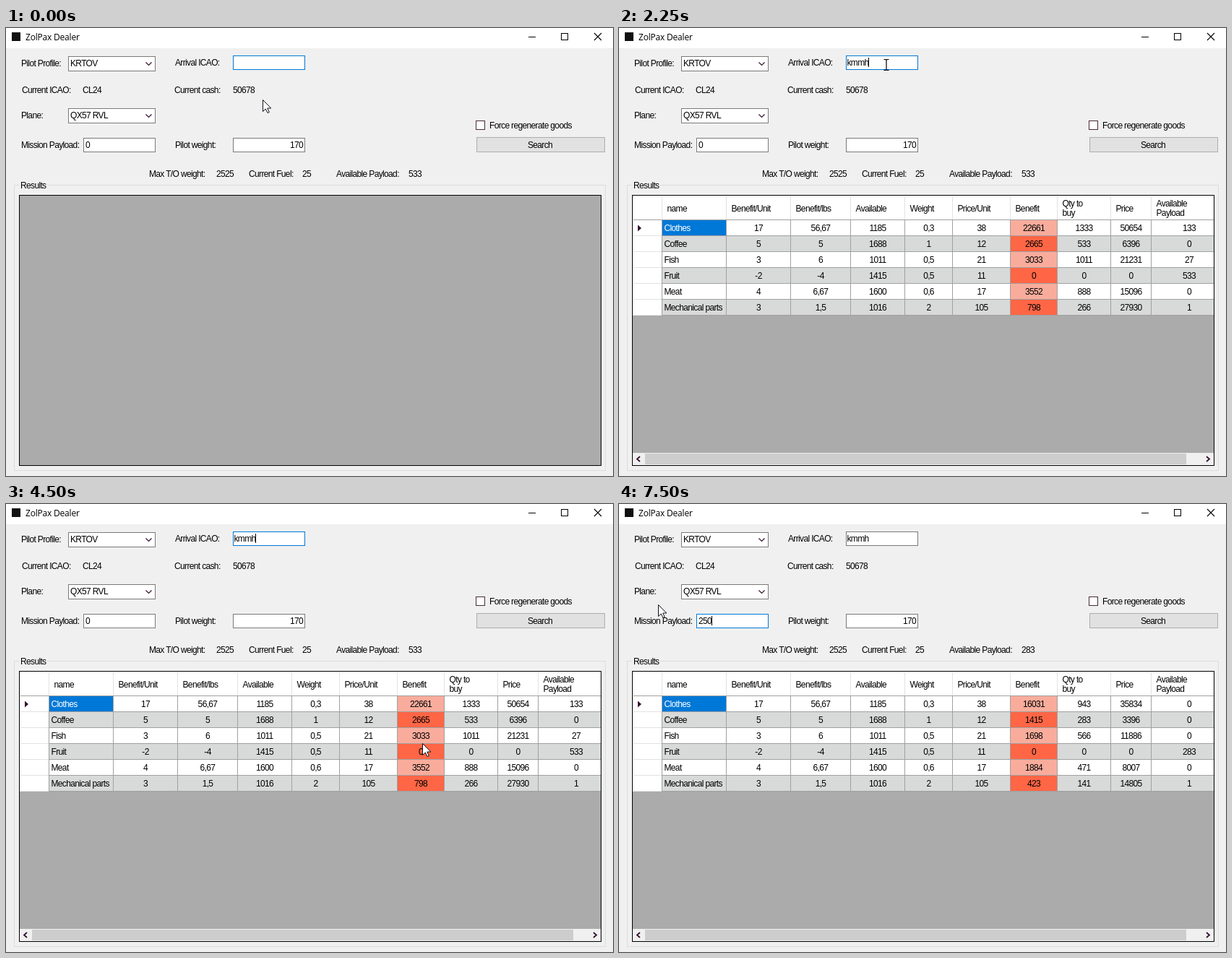
These frames come from a looping animation (840x620 px, 8 s). An HTML page:

```html
<!DOCTYPE html>
<html lang="en">
<head>
<meta charset="utf-8">
<title>ZolPax Dealer</title>
<style>
  html, body { margin: 0; width: 840px; height: 620px; overflow: hidden; background: #f0f0f0; }
  svg { display: block; }
  rect, line { shape-rendering: crispEdges; }
  text { font: 12px "Liberation Sans", Arial, sans-serif; letter-spacing: -.65px; white-space: pre; }
  .title { font: 12px "Open Sans", "Noto Sans", sans-serif; letter-spacing: -.2px; }
  .mid { text-anchor: middle; }
  .end { text-anchor: end; }
</style>
</head>
<body>
<svg id="stage" width="840" height="620" viewBox="0 0 840 620"></svg>
<script>
const LOOP = 8000, BLUE = '#0078d7', EDGE = '#7a7a7a', DARK = '#35102f', GRID = '#a0a0a0';
const stage = document.getElementById('stage');
let layer = stage;

function el(tag, attrs, content) {
  const node = document.createElementNS('http://www.w3.org/2000/svg', tag);
  for (const key in attrs) node.setAttribute(key, attrs[key]);
  if (content !== undefined) node.textContent = content;
  return layer.appendChild(node);
}
const rect = (x, y, w, h, fill) => el('rect', { x, y, width: w, height: h, fill });
const box = (x, y, w, h, fill, stroke) =>
  el('rect', { x: x + .5, y: y + .5, width: w - 1, height: h - 1, fill, stroke });
const text = (x, y, s, cls = '') => el('text', { x, y, class: cls }, s);
const path = (d, stroke, width = 1, fill = 'none') =>
  el('path', { d, stroke, 'stroke-width': width, fill });
const group = () => { layer = stage; return layer = el('g', {}); };
const show = (node, on) => node.setAttribute('visibility', on ? 'visible' : 'hidden');

// Title bar
rect(0, 0, 840, 28, '#fff');
rect(8, 6, 12, 12, '#111');
text(27, 17, 'ZolPax Dealer', 'title');
rect(723, 12, 10, 1, '#000');
box(768, 7, 10, 10, 'none', '#000');
path('M814 7l10 10M824 7l-10 10', '#000', 1.1);

// Form
[
  [21, 53, 'Pilot Profile:'], [234, 52, 'Arrival ICAO:'],
  [22, 90, 'Current ICAO:'], [106, 90, 'CL24'],
  [233, 90, 'Current cash:'], [314, 90, '50678'],
  [21, 125, 'Plane:'], [21, 166, 'Mission Payload:'], [234, 166, 'Pilot weight:'],
  [198, 206, 'Max T/O weight:'], [291, 206, '2525'],
  [336, 206, 'Current Fuel:'], [410, 206, '25'],
  [457, 206, 'Available Payload:'], [669, 139, 'Force regenerate goods']
].forEach(label => text(...label));
const payloadText = text(557, 206, '533');

function combo(y, value) {
  box(86, y, 121, 21, '#fff', EDGE);
  text(89, y + 14, value);
  path(`M193.5 ${y + 8.5}l4 4 4-4`, DARK, 1.2);
}
combo(39, 'KRTOV');
combo(111, 'QX57 RVL');

const arrivalBox = box(314, 38, 100, 20, '#fff', BLUE);
const missionBox = box(107, 152, 100, 20, '#fff', EDGE);
box(314, 152, 100, 20, '#fff', EDGE);
text(411, 166, '170', 'end');
box(650, 128, 13, 13, '#fff', '#4a2c33');
box(651, 151, 178, 21, '#e1e1e1', '#adadad');
text(739, 166, 'Search', 'mid');

const selection = rect(110, 155, 7, 13, BLUE);
const arrivalText = text(315.5, 52, '');
const missionText = text(110, 166, '0');
const caret = rect(317, 41, 1, 13, '#000');

// Results frame
box(11, 217, 819, 396, 'none', '#dcdcdc');
rect(18, 212, 39, 12, '#f0f0f0');
text(20, 222, 'Results');
box(18, 231, 806, 375, '#ababab', '#000');

// Results table
const heads = ['name', 'Benefit/Unit', 'Benefit/lbs', 'Available', 'Weight', 'Price/Unit',
  'Benefit', 'Qty to|buy', 'Price', 'Available|Payload'];
const edges = [59, 148, 237, 320, 395, 461, 541, 606, 680, 736, 823];
// name, benefit per unit, stock, weight, unit price
const goods = [
  ['Clothes', 17, 1185, .3, 38], ['Coffee', 5, 1688, 1, 12], ['Fish', 3, 1011, .5, 21],
  ['Fruit', -2, 1415, .5, 11], ['Meat', 4, 1600, .6, 17], ['Mechanical parts', 3, 1016, 2, 105]
];
const CASH = 50678, PAYLOAD = 533;

function quantity([, gain, stock, weight, price], room) {
  if (gain <= 0) return 0;
  const byCash = Math.floor(CASH / price), byWeight = Math.floor(room / weight);
  return byCash < byWeight ? byCash : Math.min(byWeight, stock);
}
function values(item, room) {
  const [name, gain, stock, weight, price] = item, qty = quantity(item, room);
  return [name, gain, +(gain / weight).toFixed(2), stock, weight, price,
    Math.max(0, gain * qty), qty, price * qty, Math.floor(room - qty * weight)];
}

const table = group();
rect(19, 232, 804, 166, '#fff');
const hover = rect(0, 233, 0, 32, '#d9ebf9');
heads.forEach((head, c) => {
  const lines = head.split('|'), x = edges[c] + 7.5;
  lines.forEach((s, i) => text(x, lines.length > 1 ? 247 + 13 * i : 254, s));
  rect(edges[c], 233, 1, 32, '#e2e2e2');
});
const cells = goods.map((item, r) => {
  const y = 266 + 22 * r, odd = r % 2;
  rect(60, y, 763, 21, odd ? '#d8dad9' : '#fff');
  rect(542, y, 64, 21, odd ? '#ff6646' : '#f9ac9c');
  if (!r) rect(60, y, 88, 21, BLUE);
  rect(20, y + 21, 39, 1, '#e2e2e2');
  rect(59, y + 21, 764, 1, GRID);
  return heads.map((_, c) => {
    const x = c === 9 ? 789 : (edges[c] + edges[c + 1]) / 2 + .5;
    const cell = c ? text(x, y + 15, '', 'mid') : text(62.5, y + 15, '');
    if (!r && !c) cell.setAttribute('fill', '#fff');
    return cell;
  });
});
rect(20, 265, 803, 1, GRID);
edges.slice(0, -1).forEach(x => rect(x, 265, 1, 133, GRID));
path('M26 272.5l5 4.5-5 4.5z', 'none', 0, DARK);
rect(19, 588, 804, 17, '#f0f0f0');
rect(36, 589, 749, 15, '#cdcdcd');
path('M29 593l-4 3.5 4 3.5M813 593l4 3.5-4 3.5', DARK, 1.8);

// Pointers
group();
const arrow = path('M.5 .5V16.5L4.3 13 7 18.5 9.3 17.5 6.8 12H11.8Z', '#101018', 1, '#fff');
const beam = path('M-3.5 -7.5H-1L0 -6.5 1 -7.5H3.5M0 -6.5V6.5M-3.5 7.5H-1L0 6.5 1 7.5H3.5', '#000', 1.2);

// Each step changes part of the state from its time on
const steps = [
  [0, { pointer: 'arrow', x: 355, y: 99, arrival: '', mission: '0', edge: BLUE,
        inMission: false, selected: false, caret: false, hover: -1, table: false }],
  [250, { x: 362, y: 76, caret: true }],
  [500, { pointer: 'beam', x: 370, y: 51 }],
  [750, { caret: false }],
  [1250, { pointer: '', arrival: 'k', caret: true }],
  [1500, { arrival: 'km' }],
  [1750, { arrival: 'kmm' }],
  [2000, { arrival: 'kmmh' }],
  [2250, { pointer: 'beam', table: true }],
  [2500, { pointer: 'arrow', x: 453, y: 11 }],
  [2750, { x: 180, y: 246, hover: 1 }],
  [3000, { x: 345, y: 246, hover: 3, caret: false }],
  [3250, { x: 500, y: 248, hover: 5 }],
  [3500, { x: 607, y: 316, hover: -1, caret: true }],
  [3750, { x: 617, y: 242, hover: 7 }],
  [4000, { x: 582, y: 291, hover: -1, caret: false }],
  [4250, { x: 578, y: 312 }],
  [4500, { x: 576, y: 331, caret: true }],
  [4750, { x: 572, y: 382 }],
  [5000, { x: 430, y: 290, caret: false }],
  [5250, { x: 250, y: 190 }],
  [5500, { pointer: 'beam', x: 176, y: 163, inMission: true, caret: true, edge: '#3d79a9' }],
  [5750, { x: 115, y: 160, selected: true, caret: false }],
  [6000, { x: 44, y: 150 }],
  [6250, { pointer: 'arrow', x: 54, y: 139, edge: EDGE }],
  [6750, { caret: true }],
  [7250, { mission: '25', selected: false }],
  [7500, { mission: '250' }]
];

function placeCaret(s) {
  const field = s.inMission ? missionText : arrivalText;
  const start = +field.getAttribute('x');
  const length = s.selected || !field.textContent ? 0 : field.getComputedTextLength();
  const x = Math.floor(start + length);
  caret.setAttribute('x', s.inMission ? x : Math.max(317, x));
  caret.setAttribute('y', s.inMission ? 155 : 41);
  caret.setAttribute('fill', s.selected ? '#ff8728' : '#000');
  show(caret, s.caret);
}

function render(time) {
  const s = Object.assign({}, ...steps.filter(step => step[0] <= time).map(step => step[1]));
  const room = PAYLOAD - s.mission;

  arrivalText.textContent = s.arrival;
  missionText.textContent = s.mission;
  missionText.setAttribute('fill', s.selected ? '#fff' : '#000');
  arrivalBox.setAttribute('stroke', s.edge);
  missionBox.setAttribute('stroke', s.inMission ? BLUE : EDGE);
  payloadText.textContent = room;
  show(selection, s.selected);
  placeCaret(s);

  show(table, s.table);
  goods.forEach((item, r) => values(item, room).forEach((v, c) => {
    cells[r][c].textContent = String(v).replace('.', ',');
  }));
  const over = s.hover >= 0;
  hover.setAttribute('x', over ? edges[s.hover] + 1 : 0);
  hover.setAttribute('width', over ? edges[s.hover + 1] - edges[s.hover] - 1 : 0);

  show(arrow, s.pointer === 'arrow');
  show(beam, s.pointer === 'beam');
  for (const p of [arrow, beam]) p.setAttribute('transform', `translate(${s.x} ${s.y})`);
}

function frame() {
  render(performance.now() % LOOP);
  requestAnimationFrame(frame);
}
frame();
</script>
</body>
</html>
```
